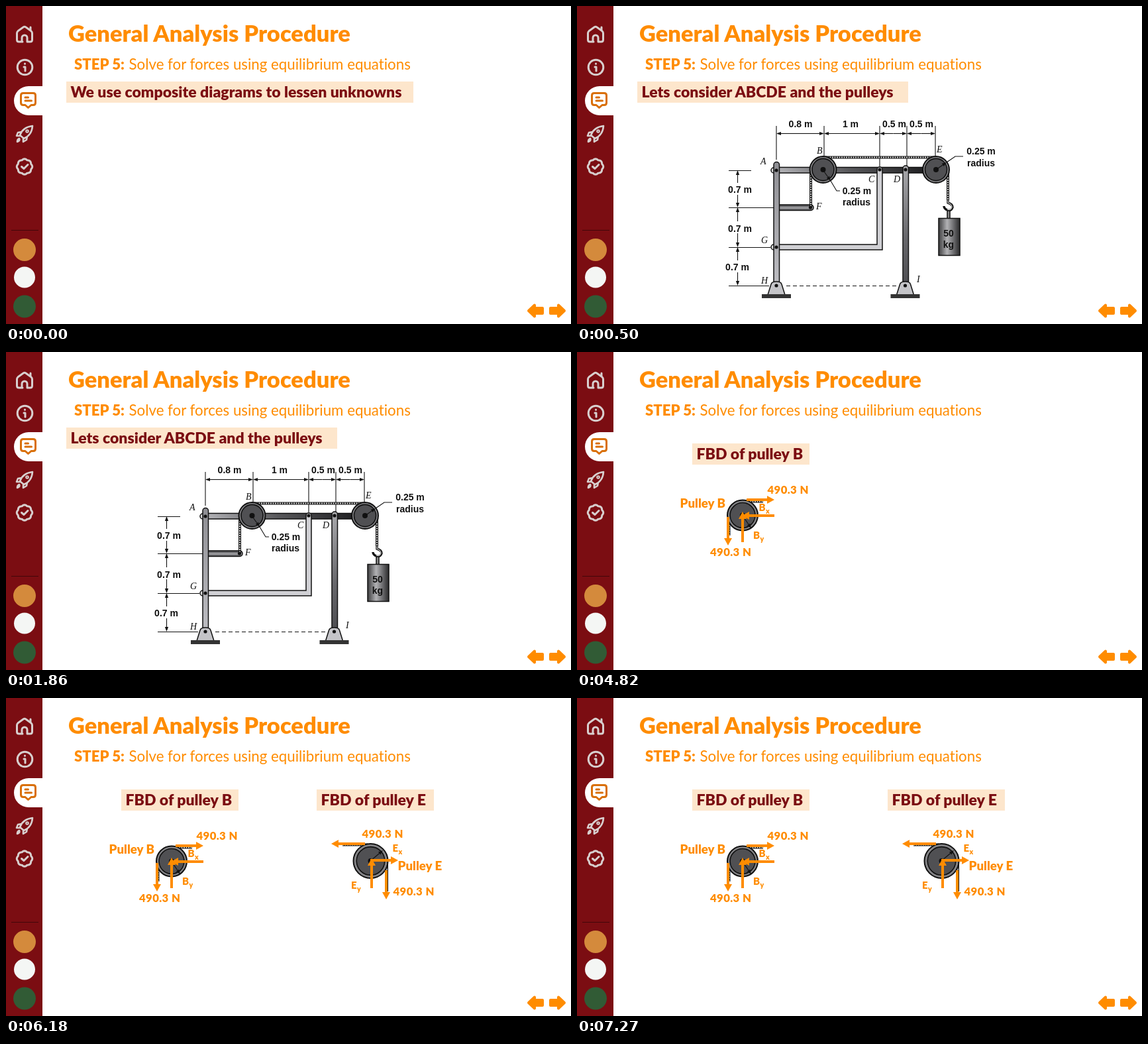
An HTML page for the animation above (8000 ms loop, 853 px wide and 480 px high).

```html
<!DOCTYPE html>
<html lang="en">
<head>
<meta charset="utf-8">
<title>General Analysis Procedure</title>
<style>
html, body { margin: 0; width: 100%; height: 100%; overflow: hidden; background: #fff; }
svg { display: block; width: 100vw; height: 100vh; }
text { font-family: Lato, "Open Sans", sans-serif; font-weight: 900; font-variant-ligatures: none; }
.accent { fill: #ff8c00; }
.head { fill: #7b0d12; font-size: 23.05px; }
.force { fill: #ff8c00; font-size: 16.7px; letter-spacing: .4px; }
.dim { font: bold 14px "Liberation Sans", Arial, sans-serif; text-anchor: middle; fill: #111; }
.point { font: italic 14px "Liberation Serif", "Times New Roman", serif; fill: #111; }
.icon { fill: none; stroke: #d8cfce; stroke-width: 3; stroke-linecap: round; stroke-linejoin: round; }
.thin { fill: none; stroke: #111; stroke-width: 1.1; }
.bar { stroke: #111; stroke-width: 1.5; }
</style>
</head>
<body>
<svg viewBox="0 0 853 480" preserveAspectRatio="none">
  <defs>
    <linearGradient id="beam">
      <stop offset="0" stop-color="#b4b4b8"/><stop offset=".45" stop-color="#59595c"/><stop offset="1" stop-color="#19191b"/>
    </linearGradient>
    <linearGradient id="post" x2="0" y2="1">
      <stop offset="0" stop-color="#8e8e93"/><stop offset="1" stop-color="#bdbdc2"/>
    </linearGradient>
    <linearGradient id="leg" x2="0" y2="1">
      <stop offset="0" stop-color="#aaaaad"/><stop offset=".6" stop-color="#68686c"/><stop offset="1" stop-color="#4d4d51"/>
    </linearGradient>
    <linearGradient id="stub" x2="0" y2="1">
      <stop offset="0" stop-color="#333336"/><stop offset=".55" stop-color="#a5a5a8"/><stop offset="1" stop-color="#48484b"/>
    </linearGradient>
    <linearGradient id="mass">
      <stop offset="0" stop-color="#3c3c3e"/><stop offset=".4" stop-color="#b2b2b5"/><stop offset="1" stop-color="#29292b"/>
    </linearGradient>
  </defs>
  <rect width="853" height="480" fill="#fff"/>

  <rect width="55" height="480" fill="#7b0d12"/>
  <path d="M55 121H34a22 22 0 0 0 0 44H55Z" fill="#fff"/>
  <g class="icon">
    <path d="M25 54H19.500Q16.500 54 16.500 51V41Q16.500 39 18 37.800L26 32Q28 30.700 30 32L38 37.800Q39.500 39 39.500 41V51Q39.500 54 36.500 54H32V48a4 4 0 0 0-8 0V54M37 32V36"/>
    <circle cx="28.500" cy="92.500" r="11.300"/>
    <path d="M27 92H29V98M28.500 87V87.200"/>
    <path d="M26 131.500H41Q44.500 131.500 44.500 135V146Q44.500 149.500 41 149.500H38L33.500 153.500 29 149.500H26Q22.500 149.500 22.500 146V135Q22.500 131.500 26 131.500ZM29 138H33.500M29 143H38.500" stroke="#d96f08"/>
    <path d="M21 195Q25 183 40 181Q39 195 27 200ZM23 190L18 191 16 196 21 196M32 197L31 202 26 205 26 200M17 205Q17 201 20 200Q22 203 17 205" stroke-width="2.600"/>
    <circle cx="32" cy="189" r="1.800" stroke-width="2"/>
    <path id="badge"/>
    <path d="M23.500 242.500L27 245.500 33 239.500"/>
  </g>
  <path d="M8 338.500H49" stroke="#420609"/>
  <circle cx="28" cy="368" r="17" fill="#d48a3c"/>
  <circle cx="28" cy="409.500" r="16" fill="#f4f6f4"/>
  <circle cx="28" cy="453.500" r="17" fill="#315b35"/>

  <text class="accent" x="94" y="53.500" font-size="34.500">General Analysis Procedure</text>
  <text class="accent" x="103" y="95.500" font-size="22.200">STEP 5:</text>
  <text class="accent" x="185.500" y="95.500" font-size="22.300" style="font-weight:400">Solve for forces using equilibrium equations</text>
  <g class="accent" stroke="#ff8c00" stroke-width="4" stroke-linejoin="round">
    <path id="next" d="M843 460L834 451.500V456H822V464H834V468.500Z"/>
    <use href="#next" transform="matrix(-1 0 0 1 1632 0)"/>
  </g>
  <g id="intro"></g>
  <g id="frame"></g>
  <g id="pulleyB"></g>
  <g id="pulleyE"></g>
</svg>
<script>
const LOOP = 8000;
const $ = id => document.getElementById(id);

const text = (cls, x, y, s) => `<text class="${cls}" x="${x}" y="${y}">${s}</text>`;
const thin = (d, extra = '') => `<path class="thin" d="${d}" ${extra}/>`;
const bar = (x, y, w, h, fill, r = 4) =>
  `<rect class="bar" x="${x}" y="${y}" width="${w}" height="${h}" rx="${r}" fill="${fill}"/>`;
const dot = (x, y, r = 2.6) => `<circle cx="${x}" cy="${y}" r="${r}" fill="#111"/>`;
const banner = (x, y, w, s) =>
  `<rect x="${x}" y="${y}" width="${w}" height="32" fill="#fde6cc"/>` + text('head', x + 6.5, y + 23.5, s);
const force = (x, y, s, sub) => text('force', x, y, sub
  ? `<tspan font-size="15">${s}</tspan><tspan font-size="10.5" dy="4">${sub}</tspan>` : s);
const name = (x, y, s) => `<text class="accent" x="${x}" y="${y}" font-size="18.7">${s}</text>`;

function arrow(x1, y1, x2, y2, color = '#ff8c00', width = 4, len = 11, half = 6) {
  const d = Math.hypot(x2 - x1, y2 - y1), ux = (x2 - x1) / d, uy = (y2 - y1) / d;
  const bx = x2 - ux * len, by = y2 - uy * len;
  return `<path d="M${x1} ${y1}L${bx} ${by}" stroke="${color}" stroke-width="${width}"/>` +
    `<path d="M${x2} ${y2}L${bx - uy * half} ${by + ux * half} ${bx + uy * half} ${by - ux * half}Z" fill="${color}"/>`;
}
const dark = (x1, y1, x2, y2) => arrow(x1, y1, x2, y2, '#111', 1.1, 7, 2.6);

const rope = (x1, y1, x2, y2) =>
  `<path d="M${x1} ${y1}L${x2} ${y2}" stroke="#111" stroke-width="4"/>` +
  `<path d="M${x1} ${y1}L${x2} ${y2}" stroke="#ddd" stroke-width="2" stroke-dasharray="2 1.5"/>`;

const wheel = (x, y, r) =>
  `<circle cx="${x}" cy="${y}" r="${r - 1}" fill="#858588" stroke="#111" stroke-width="2"/>` +
  `<circle cx="${x}" cy="${y}" r="${r * .79}" fill="#505053" stroke="#111" stroke-width="1.6"/>` + dot(x, y, 4);

const support = x =>
  `<path class="bar" d="M${x - 13} 436L${x - 8} 420Q${x - 7} 416 ${x} 416T${x + 8} 420L${x + 13} 436Z" fill="#c4c4c8"/>` +
  `<rect x="${x - 22}" y="435" width="44" height="6" fill="#333"/>` + dot(x, 422);

function dimensions() {
  const xs = [301, 373, 457, 498, 541], ends = [232, 226, 242, 242, 226];
  const ys = [248, 304, 364, 422], right = [263, 297, 292, 290];
  let s = '';
  xs.forEach((x, i) => {
    s += thin(`M${x} 181V${ends[i]}`);
    if (i) s += dark((x + xs[i - 1]) / 2, 192.5, x, 192.5) + dark((x + xs[i - 1]) / 2, 192.5, xs[i - 1], 192.5);
  });
  ys.forEach((y, i) => {
    s += thin(`M229 ${y}.5H${right[i]}`);
    if (i) {
      const mid = (y + ys[i - 1]) / 2;
      s += dark(242.5, mid + 9, 242.5, y) + dark(242.5, mid - 9, 242.5, ys[i - 1]);
      s += text('dim', i < 3 ? 246 : 242, [0, 282, 341, 399][i], '0.7 m');
    }
  });
  [[337.5, '0.8 m'], [413, '1 m'], [479, '0.5 m'], [520, '0.5 m']].forEach(([x, t]) => s += text('dim', x, 183, t));
  return s;
}

function structure() {
  const points = [['A', 277, 239], ['B', 362, 223], ['E', 543, 221], ['C', 440, 266], ['D', 478, 266],
    ['F', 361, 307], ['G', 278, 358], ['H', 278, 419], ['I', 513, 417]];
  return dimensions() +
    thin('M316 422.5H486', 'stroke-dasharray="6 4"') +
    bar(293, 244, 14, 8, '#ddd') + bar(293, 360, 14, 8, '#ddd') +
    bar(301, 243.5, 240, 8.5, 'url(#beam)', 2) +
    bar(302, 300, 55, 8.5, 'url(#stub)') +
    '<path class="bar" d="M301 360H453V247a4 4 0 0 1 8 0V368H301Z" fill="#d0d0d4"/>' +
    bar(297, 235.5, 8.5, 185, 'url(#post)') + bar(492, 241, 8.5, 180, 'url(#leg)') +
    support(301) + support(495.5) +
    rope(371, 228.5, 542, 228.5) + rope(353, 248, 353, 304) + rope(560, 248, 560, 293) +
    wheel(371.5, 247, 21) + wheel(542, 247, 21) +
    [[301, 248], [301, 364], [352.5, 304], [457, 247], [496, 247]].map(p => dot(...p)).join('') +
    dark(371, 247, 383, 264) + thin('M383 264L392 279H397') +
    dark(542, 247, 558, 236) + thin('M558 236L571 227H583') +
    '<path d="M560 292V297Q567 299 567 304Q565 310 559 308Q554 306 554 302" fill="none" stroke="#111" stroke-width="3.4"/>' +
    '<path d="M560 293V297Q566 299 566 304Q564 309 559 307" fill="none" stroke="#ccc" stroke-width="1.2"/>' +
    bar(559, 309, 4, 12, '#888', 0) + bar(546, 320.5, 32, 56, 'url(#mass)', 0) +
    text('dim', 561, 348, '50') + text('dim', 561, 365, 'kg') +
    text('dim', 422.5, 284, '0.25 m') + text('dim', 422, 301, 'radius') +
    text('dim', 610, 224, '0.25 m') + text('dim', 610, 242, 'radius') +
    points.map(([s, x, y]) => text('point', x, y, s)).join('');
}

// Eight rounded lobes
function badge() {
  let d = '';
  for (let a = 0; a < 360; a += 5) {
    const t = a * Math.PI / 180, r = 10.4 + 1.3 * Math.abs(Math.cos(4 * t));
    d += `${a ? 'L' : 'M'}${(28 + r * Math.cos(t)).toFixed(2)} ${(242.5 + r * Math.sin(t)).toFixed(2)}`;
  }
  return d + 'Z';
}

$('badge').setAttribute('d', badge());
$('intro').innerHTML = banner(91, 114, 524, 'We use composite diagrams to lessen unknowns');
$('frame').innerHTML = banner(91, 114, 409, 'Lets consider ABCDE and the pulleys') + structure();
$('pulleyB').innerHTML = banner(174, 138, 177, 'FBD of pulley B') +
  rope(254, 225.5, 281, 225.5) + rope(229.5, 247, 229.5, 277) + wheel(250, 246.5, 24) +
  dark(250, 247, 263, 266) +
  arrow(256, 223, 298, 223) + arrow(298, 247, 249, 247) + arrow(228, 249, 228, 292) + arrow(250, 287, 250, 241) +
  name(155.5, 235, 'Pulley B') + force(287.5, 214, '490.3 N') + force(201, 308, '490.3 N') +
  force(274.5, 240, 'B', 'x') + force(266, 282, 'B', 'y');
$('pulleyE').innerHTML = banner(469, 138, 177, 'FBD of pulley E') +
  rope(508, 221.5, 546, 221.5) + rope(575, 247, 575, 292) + wheel(550.5, 246, 27) +
  dark(550, 246, 569, 230) +
  arrow(542, 220, 491, 220) + arrow(550, 245, 592, 245) + arrow(574, 260, 574, 304) + arrow(552, 287, 552, 242) +
  name(591.5, 260, 'Pulley E') + force(537.5, 211, '490.3 N') + force(584.5, 298, '490.3 N') +
  force(583.5, 232, 'E', 'x') + force(521, 288, 'E', 'y');

// id, first ms, last ms
const scenes = [['intro', 0, 500], ['frame', 500, 2770], ['pulleyB', 2770, LOOP], ['pulleyE', 6180, LOOP]];

function draw(t) {
  for (const [id, from, to] of scenes) $(id).style.display = t >= from && t < to ? '' : 'none';
}
function tick() {
  draw(performance.now() % LOOP);
  requestAnimationFrame(tick);
}
tick();
</script>
</body>
</html>
```
